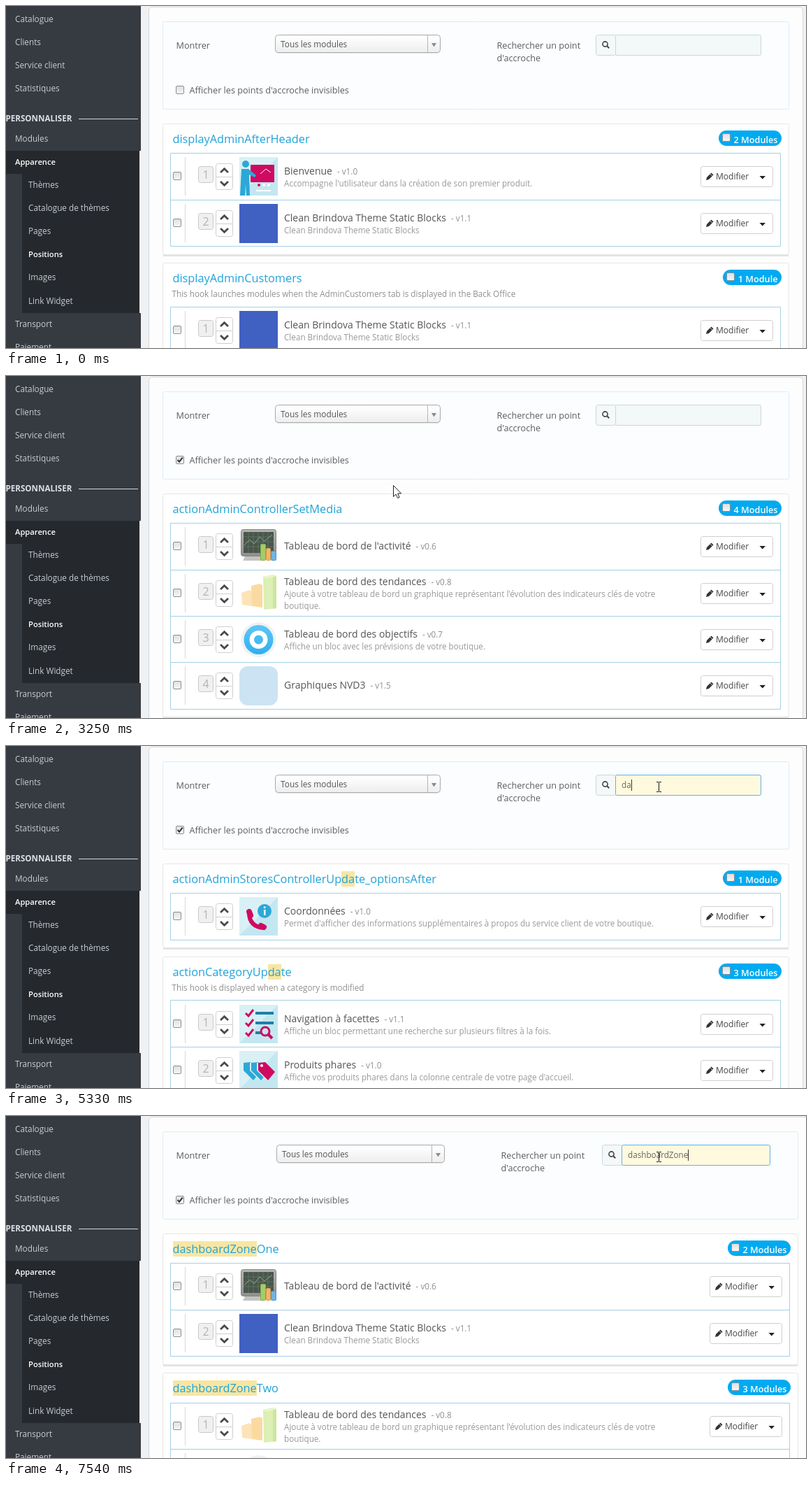
Recreate the animation shown at these times as an HTML page with a canvas. Size 1145 px wide and 489 px high, loop 8 s.

```html
<!DOCTYPE html>
<html lang="fr">
<head>
<meta charset="utf-8">
<title>Positions</title>
<style>
html, body { margin: 0; width: 100%; height: 100%; overflow: hidden; background: #eff1f2; }
canvas { display: block; }
</style>
</head>
<body>
<canvas id="stage" width="1145" height="489"></canvas>
<script>
const g = document.getElementById('stage').getContext('2d');
const LOOP = 8000, STEP = 130;
const BLUE = '#1fa3da', PINK = '#cf0a60', INK = '#4a4a4a';

const MODS = {
  welcome: ['Bienvenue', '1.0', ["Accompagne l'utilisateur dans la création de son premier produit."]],
  blocks: ['Clean Brindova Theme Static Blocks', '1.1', ['Clean Brindova Theme Static Blocks']],
  activity: ["Tableau de bord de l'activité", '0.6', []],
  trends: ['Tableau de bord des tendances', '0.8',
    ["Ajoute à votre tableau de bord un graphique représentant l'évolution des indicateurs clés de votre", 'boutique.']],
  goals: ['Tableau de bord des objectifs', '0.7', ['Affiche un bloc avec les prévisions de votre boutique.']],
  nvd3: ['Graphiques NVD3', '1.5', []],
  contact: ['Coordonnées', '1.0',
    ["Permet d'afficher des informations supplémentaires à propos du service client de votre boutique."]],
  facets: ['Navigation à facettes', '1.1',
    ['Affiche un bloc permettant une recherche sur plusieurs filtres à la fois.']],
  featured: ['Produits phares', '1.0',
    ["Affiche vos produits phares dans la colonne centrale de votre page d'accueil."]],
  products: ['Tableau de bord Produits', '0.3',
    ['Ajoute un bloc avec un tableau de vos dernières commandes et le classement de vos meilleurs', 'produits']]
};

const panel = (title, count, mods, note) => ({ title, count, mods: mods.split(' '), note });
const VIEWS = {
  visible: [
    panel('displayAdminAfterHeader', 2, 'welcome blocks'),
    panel('displayAdminCustomers', 1, 'blocks',
      'This hook launches modules when the AdminCustomers tab is displayed in the Back Office')
  ],
  all: [panel('actionAdminControllerSetMedia', 4, 'activity trends goals nvd3')],
  da: [
    panel('actionAdminStoresControllerUpdate_optionsAfter', 1, 'contact'),
    panel('actionCategoryUpdate', 3, 'facets featured', 'This hook is displayed when a category is modified')
  ],
  data: [panel('dashboardData', 5, 'activity trends goals products blocks')],
  zone: [
    panel('dashboardZoneOne', 2, 'activity blocks'),
    panel('dashboardZoneTwo', 3, 'trends goals')
  ]
};

const TYPED = [[5330, 'da'], [5590, 'dash'], [5850, 'dashb'], [5980, 'dashbo'], [6110, 'dashboar'],
  [6370, 'dashboard'], [7020, 'dashboardZ'], [7410, 'dashboardZon'], [7540, 'dashboardZone']];

// ---- helpers ----
function text(s, x, y, size, color, weight = 400) {
  g.font = `${weight} ${size}px "Open Sans", "Noto Sans", sans-serif`;
  g.fillStyle = color;
  g.fillText(s, x, y);
  return g.measureText(s).width;
}
function width(s, size, weight = 400) {
  g.font = `${weight} ${size}px "Open Sans", "Noto Sans", sans-serif`;
  return g.measureText(s).width;
}
function rect(x, y, w, h, color) {
  g.fillStyle = color;
  g.fillRect(x, y, w, h);
}
function box(x, y, w, h, fill, stroke, r = 0) {
  g.beginPath();
  if (stroke) g.roundRect(x + .5, y + .5, w - 1, h - 1, r);
  else g.roundRect(x, y, w, h, r);
  g.fillStyle = fill;
  g.fill();
  if (stroke) { g.strokeStyle = stroke; g.lineWidth = 1; g.stroke(); }
}
function trace(pts) {
  g.beginPath();
  for (let i = 0; i < pts.length; i += 2) g.lineTo(pts[i], pts[i + 1]);
}
function poly(color, ...pts) {
  trace(pts);
  g.fillStyle = color;
  g.fill();
}
function line(color, w, ...pts) {
  trace(pts);
  g.strokeStyle = color;
  g.lineWidth = w;
  g.stroke();
}
function disc(x, y, r, color) {
  g.beginPath();
  g.arc(x, y, r, 0, 7);
  g.fillStyle = color;
  g.fill();
}
function ring(x, y, r, w, color) {
  g.beginPath();
  g.arc(x, y, r, 0, 7);
  g.strokeStyle = color;
  g.lineWidth = w;
  g.stroke();
}
function fade(y0, y1, a, b) {
  const f = g.createLinearGradient(0, y0, 0, y1);
  f.addColorStop(0, a);
  f.addColorStop(1, b);
  return f;
}
function checkbox(x, y, on) {
  box(x, y, 12, 12, fade(y, y + 12, '#dedede', '#f8f8f8'), '#8e8e8e', 1.5);
  if (on) line('#333', 2, x + 2.5, y + 6, x + 5, y + 8.7, x + 9.7, y + 2.7);
}
function pale() {
  rect(0, 0, 55, 55, '#c3e7f0');
  poly('#d8f0f6', 0, 0, 55, 0, 0, 55);
}

// ---- module icons, 55 px square ----
const ICONS = {
  welcome() {
    pale();
    rect(16, 11, 34, 25, PINK);
    line('#fff', 1, 30, 24, 38, 17, 45, 22);
    disc(9, 10, 5, '#2ba8d6');
    poly('#2ba8d6', 3, 17, 13, 17, 24, 26, 22, 29, 14, 25, 15, 55, 10, 55, 9, 39, 8, 55, 1, 55);
    disc(28, 40, 2, PINK);
    disc(35, 40, 2, '#fff');
    disc(42, 40, 2, '#fff');
    line('#fff', 2, 24, 48, 45, 48);
  },
  blocks() { rect(0, 0, 55, 56, '#4060c2'); },
  activity() {
    box(2, 3, 51, 39, fade(3, 42, '#b4b4b2', '#8f8f8d'), '#858583', 3);
    rect(6, 7, 43, 30, '#48564c');
    g.globalAlpha = .3;
    for (let i = 1; i < 6; i++) line('#8aa88c', 1, 6 + i * 7, 7, 6 + i * 7, 37);
    for (let i = 1; i < 4; i++) line('#8aa88c', 1, 6, 7 + i * 7, 49, 7 + i * 7);
    g.globalAlpha = 1;
    line('#86a585', 1, 7, 26, 15, 18, 21, 24, 29, 14, 36, 20, 47, 11);
    poly('#c3c3bf', 8, 42, 32, 42, 34, 48, 5, 48);
    box(30, 24, 8, 24, '#a5cc68', '#86ab50', 1);
    box(38, 30, 7, 18, '#f3b468', '#d59a4c', 1);
    box(45, 34, 8, 14, '#6cb5e6', '#4c95c4', 1);
  },
  trends() {
    poly('#fce4b8', 3, 27, 14, 23, 18, 25, 18, 46, 4, 44);
    poly('#fbdaa2', 17, 17, 29, 14, 33, 16, 33, 48, 18, 46);
    poly('#dcefb4', 34, 4, 48, 1, 53, 3, 53, 49, 35, 51);
    poly('#cce69c', 48, 1, 53, 3, 53, 49, 48, 50);
    poly('#e9f5cc', 34, 4, 48, 1, 53, 3, 38, 7);
  },
  goals() {
    disc(27.5, 28, 25, '#eef2f4');
    disc(27.5, 28, 21, fade(7, 49, '#5cc6f6', '#2fb0ee'));
    disc(27.5, 28, 13, '#fff');
    disc(27.5, 28, 6.5, '#45bbf2');
  },
  nvd3() { box(0, 0, 55, 56, '#cce3f4', null, 12); },
  contact() {
    pale();
    disc(36, 20, 10, '#2ba8d6');
    rect(35, 18, 2.5, 8, '#fff');
    disc(36.2, 14.7, 1.5, '#fff');
    g.lineCap = 'round';
    g.beginPath();
    g.moveTo(14, 24);
    g.quadraticCurveTo(15, 42, 34, 44);
    g.strokeStyle = PINK;
    g.lineWidth = 6;
    g.stroke();
    line(PINK, 8, 14, 21, 16, 26);
    line(PINK, 8, 31, 41, 35, 43);
    g.lineCap = 'butt';
  },
  facets() {
    pale();
    for (let y = 12; y < 50; y += 14) {
      line(PINK, 3, 9, y, 13, y + 4, 20, y - 5);
      line('#1e7fa8', 4, 23, y, y > 30 ? 31 : 49, y);
    }
    ring(37, 38, 6, 3, PINK);
    line(PINK, 4, 41, 42, 47, 48);
  },
  featured() {
    pale();
    const tag = (x, c) => poly(c, x, 17, x + 10, 16, x + 24, 30, x + 14, 42, x, 28);
    tag(6, '#2ba8d6');
    tag(15, '#d8f0f6');
    tag(17, '#2ba8d6');
    tag(25, '#d8f0f6');
    tag(27, PINK);
    disc(32, 21, 2, '#fff');
  },
  products() {
    box(4, 3, 47, 48, '#f4f7f8', '#c0cbd0', 2);
    rect(5, 4, 45, 8, fade(4, 12, '#5ccaf4', '#30b4ea'));
    for (let y = 18; y < 48; y += 7) {
      rect(10, y, 4, 3, '#58bbea');
      rect(17, y, 28, 3, '#b3c0c7');
    }
  }
};

// ---- page parts ----
function sidebar() {
  rect(0, 0, 193, 489, '#363a41');
  rect(0, 207, 191, 33, '#25282d');
  rect(23, 240, 168, 199, '#25282d');
  rect(191, 207, 3, 232, '#eff1f2');
  const item = (s, x, y) => text(s, x, y, 11.75, '#c6ced3');
  ['Catalogue', 'Clients', 'Service client', 'Statistiques'].forEach((s, i) => item(s, 13, 23 + i * 33));
  text('PERSONNALISER', -.5, 165, 11.6, '#dcdfe2', 700);
  rect(104, 161, 85, 1, '#d5d8da');
  item('Modules', 13, 194);
  text('Apparence', 13, 227, 11.2, '#fff', 600);
  ['Thèmes', 'Catalogue de thèmes', 'Pages', 'Positions', 'Images', 'Link Widget'].forEach((s, i) => {
    const y = 260 + Math.round(i * 33.1);
    if (s === 'Positions') text(s, 32, y, 11.2, '#fff', 600);
    else item(s, 32, y);
  });
  item('Transport', 13, 459);
  item('Paiement', 13, 492);
}

function mix(a, b, k) {
  return `rgb(${a.map((v, i) => Math.round(v + (b[i] - v) * k))})`;
}

function filters(s, dx) {
  box(224, 22, 897 + dx, 126, '#fbfdff', '#dfebf5', 2);
  const label = (str, x, y) => text(str, x, y, 12.65, '#5c5c5c');
  label('Montrer', 243.5, 61);
  const sx = 385 + Math.round(dx * .16), sr = 622 + Math.round(dx * .48);
  rect(sx + 3, 67, sr - sx - 6, 1, '#e6e8ea');
  box(sx, 41, sr - sx, 26, fade(44, 62, '#fff', '#f0f0f0'), '#aaa', 4);
  rect(sr - 19, 42, 1, 24, '#b5b5b5');
  poly('#8a8a8a', sr - 13, 53, sr - 6, 53, sr - 9.5, 58.5);
  text('Tous les modules', sx + 8, 58.5, 11.85, '#555');

  const lx = 703 + Math.round(dx * .48);
  label('Rechercher un point', lx - .5, 61);
  label("d'accroche", lx - .5, 79);

  const ix = 844 + Math.round(dx * .7), ir = 1081 + dx;
  box(ix, 41, 30, 30, '#f4f8f9', '#c9d8dd', 3);
  ring(ix + 13.5, 54.5, 3.6, 1.6, '#444');
  line('#444', 2, ix + 16.2, 57.2, ix + 19.2, 60.2);
  box(ix + 28, 41, ir - ix - 28, 30, mix([243, 248, 248], [255, 250, 222], s.focus),
    mix([201, 216, 221], [102, 175, 233], s.focus), 2);
  const w = text(s.typed, ix + 37, 60, 11.7, '#666');
  if (s.caret) rect(Math.round(ix + 37 + w), 48, 1, 16, '#333');

  checkbox(243, 114, s.checked);
  label("Afficher les points d'accroche invisibles", 262.5, 124.5);
}

function row(key, n, y, dx) {
  const [name, ver, lines] = MODS[key];
  checkbox(239, y + 27);
  rect(256, y + 6, 1, 55, '#d8d8d8');
  box(275, y + 19, 22, 24, '#f0f0f0', '#c9c9c9', 3);
  g.textAlign = 'center';
  text(n, 286, y + 37, 16, '#b3b3b3');
  g.textAlign = 'left';
  box(300, y + 15, 25, 38, '#fff', '#cfcfcf', 3);
  rect(300, y + 34, 25, 1, '#cfcfcf');
  line(INK, 2.8, 307, y + 28, 312.5, y + 22.7, 318, y + 28);
  line(INK, 2.8, 307, y + 41, 312.5, y + 46.3, 318, y + 41);

  g.save();
  g.translate(334, y + 6);
  ICONS[key]();
  g.restore();

  const base = y + [38, 30.5, 21.5][lines.length];
  const w = text(name, 398, base, 14, '#555');
  text('- v' + ver, 398 + w + 7, base, 11.7, '#8f8f8f');
  lines.forEach((s, i) => text(s, 398, base + 17.7 + i * 16.5, 11.7, '#999'));

  const bx = 994 + dx;
  box(bx, y + 19, 104, 30, '#fff', '#cfcfcf', 3);
  poly('#333', bx + 8, y + 39, bx + 9, y + 35, bx + 15.5, y + 28.5, bx + 18.5, y + 31.5, bx + 12, y + 38);
  line('#fff', .8, bx + 13.5, y + 29.8, bx + 17.3, y + 33.6);
  text('Modifier', bx + 22, y + 38, 12, '#444');
  poly('#222', bx + 84.5, y + 33, bx + 93, y + 33, bx + 88.75, y + 37.5);
}

function hookPanel(p, y, typed, dx) {
  const top = y + (p.note ? 62.5 : 42.5), bottom = top + p.count * 66.25;
  const py = Math.floor(y), pb = Math.round(bottom + 12.5);
  rect(225, pb - 1, 895 + dx, 3, '#e3e3e3');
  box(224, py, 897 + dx, pb - py, '#fff', '#e6e6e6', 3);

  const at = typed ? p.title.indexOf(typed) : -1, base = Math.round(y + 27.8);
  if (at >= 0) {
    const x = 238.5 + width(p.title.slice(0, at), 16.3);
    rect(Math.round(x), base - 17, Math.round(width(typed, 16.3)), 22, '#f8e6a2');
  }
  text(p.title, 238.5, base, 16.3, BLUE);
  if (p.note) text(p.note, 237.5, y + 48.5, 11.7, '#8f8f8f');

  const badge = `${p.count} Module${p.count > 1 ? 's' : ''}`;
  const tx = 1104.5 + dx - width(badge, 12.7, 600), bx = Math.round(tx - 22);
  box(bx, py + 10, 1110 + dx - bx, 22, '#00aaf0', null, 11);
  checkbox(bx + 5, py + 14);
  text(badge, tx, base - .5, 12.7, '#fff', 600);

  const t0 = Math.floor(top);
  box(235, t0, 874 + dx, Math.round(bottom) - t0 + 1, '#fff', '#a3d0e6');
  p.mods.forEach((m, i) => {
    const ry = Math.floor(top + i * 66.25 + .3);
    if (i) rect(235, ry, 874 + dx, 1, '#a3d0e6');
    row(m, i + 1, ry, dx);
  });
  return bottom + 24.5;
}

// ---- pointer ----
function arrow(x, y) {
  g.save();
  g.translate(x + .5, y + .5);
  trace([0, 0, 0, 16, 3.6, 12.6, 6.2, 18, 8.6, 17, 6.2, 11.6, 11, 11.4]);
  g.closePath();
  g.fillStyle = '#fff';
  g.fill();
  g.strokeStyle = '#222';
  g.lineWidth = 1;
  g.stroke();
  g.restore();
}
function ibeam(x, y) {
  rect(x, y - 6, 1, 13, '#111');
  [-7, 7].forEach(d => {
    rect(x - 3, y + d, 3, 1, '#111');
    rect(x + 1, y + d, 3, 1, '#111');
  });
}
const lerp = (a, b, k) => a + (b - a) * k;
const smooth = k => k * k * (3 - 2 * k);

function pointer(t) {
  if (t < 390) return null;
  if (t < 2470) {
    const k = Math.min(1, (t - 390) / 780), e = 1 - (1 - k) ** 2;
    return [lerp(866, 918, e), lerp(153, 62, e)];
  }
  if (t < 3250) {
    const e = smooth(Math.min(1, (t - 2340) / 650));
    return [lerp(918, 250, e), lerp(62, 121, e) + 10 * Math.sin(Math.PI * e)];
  }
  const e = smooth(Math.min(1, (t - 3250) / 650));
  return [lerp(554, 934, e), lerp(156, 58, e)];
}

function stateAt(t) {
  let typed = '';
  for (const [at, s] of TYPED) if (t >= at) typed = s;
  const view = t < 3250 ? 'visible' : t < 5330 ? 'all' : t < 5590 ? 'da' : t < 7020 ? 'data' : 'zone';
  return {
    typed, view,
    checked: t >= 2990,
    focus: t < 4160 ? 0 : t < 4290 ? .5 : 1,
    caret: (t >= 4160 && t < 4680) || (t >= 5330 && t < 6890) || t >= 7020,
    dx: view === 'zone' ? 13 : 0
  };
}

function draw(now) {
  const t = Math.floor((now % LOOP) / STEP + 1e-6) * STEP;
  const s = stateAt(t);
  rect(0, 0, 1145, 489, '#eff1f2');
  box(204, 1, 937 + s.dx, 520, '#fdfdfd', '#d3d8db', 5);
  sidebar();
  filters(s, s.dx);
  let y = 168;
  for (const p of VIEWS[s.view]) y = hookPanel(p, y, s.typed, s.dx);
  const p = pointer(t);
  if (p) {
    const inside = p[0] > 873 && p[0] < 1081 && p[1] > 41 && p[1] < 71;
    (inside ? ibeam : arrow)(Math.round(p[0]), Math.round(p[1]));
  }
}

let start;
function tick(now) {
  start ??= now;
  draw(Math.max(0, now - start));
  requestAnimationFrame(tick);
}
draw(0);
requestAnimationFrame(tick);
</script>
</body>
</html>
```
